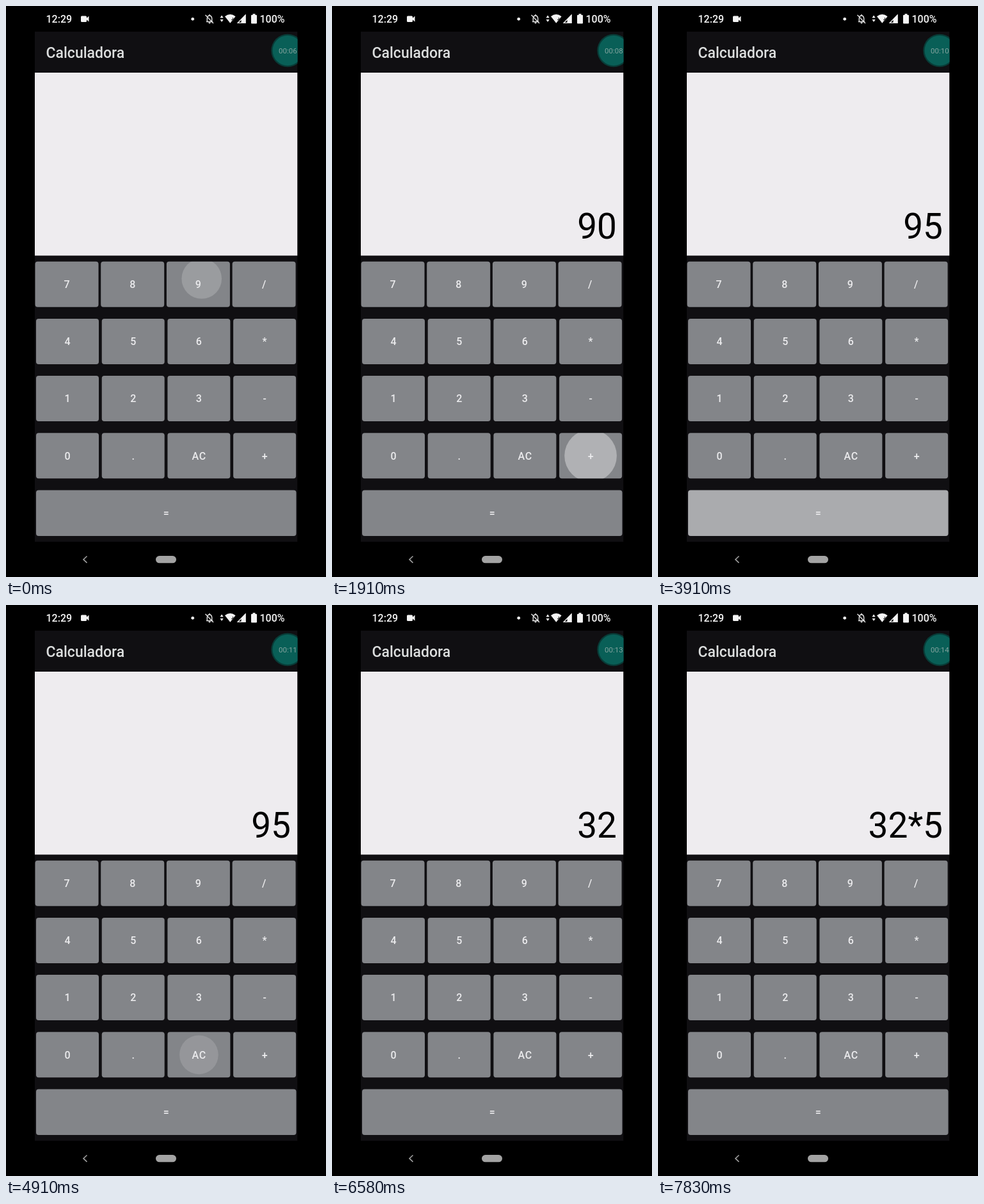
Animation of 500x891 px, one loop 8000 ms. Source, as an HTML page:

```html
<!DOCTYPE html>
<html lang="es">
<head>
<meta charset="utf-8">
<title>Calculadora</title>
<style>
  html, body { margin: 0; width: 100%; height: 100%; overflow: hidden; background: #000; }
  svg { display: block; width: 100%; height: 100%; }
  text { font-family: Roboto, sans-serif; }
  .medium { font-weight: 500; }
  .key { font-size: 16px; letter-spacing: .8px; fill: #ebebed; text-anchor: middle; }
</style>
</head>
<body>
<svg viewBox="0 0 500 891">
  <defs>
    <clipPath id="screen"><rect x="45" y="40" width="410.5" height="796"/></clipPath>
  </defs>
  <rect width="500" height="891"/>

  <!-- status bar -->
  <g fill="#f4f4f4">
    <text class="medium" x="62.5" y="26" font-size="16">12:29</text>
    <path d="M118.500 15.500h6q1.500 0 1.500 1.500v1.800l3.500-3v8.800l-3.500-3v1.900q0 1.500-1.500 1.500h-6q-1.500 0-1.500-1.500v-6.500q0-1.500 1.500-1.500z"/>
    <circle cx="291.700" cy="20.300" r="2.400"/>
    <path d="M313 24.500h10M314.300 24v-5q.4-3.600 3.700-4.300 3.300.7 3.700 4.300v5M318 14.500v-1.500M311.500 14l12.500 13" fill="none" stroke="#e4e4e4" stroke-width="1.400"/>
    <path d="M316.200 25.500h3.600q-.3 2-1.800 2t-1.800-2z"/>
    <path d="M334.500 18.500l2.600-4 2.600 4zM334.500 21l2.600 4 2.600-4z"/>
    <path d="M342 16.200q8.300-6.400 16.600 0l-8.300 10.600z"/>
    <path d="M354.500 18v6M352 21.500h5" stroke="#222" stroke-width="1" fill="none"/>
    <path d="M362.300 26.300L374 14.200v12.100z" fill="none" stroke="#f4f4f4" stroke-width="1.300"/>
    <path d="M367.500 20.800L374.500 13.500v13.300h-7z"/>
    <path d="M385.500 14v-1.800h4V14h1.500q1 0 1 1v11.500q0 1-1 1h-7q-1 0-1-1V15q0-1 1-1z"/>
    <text class="medium" x="396.5" y="26" font-size="16">100%</text>
  </g>

  <!-- app -->
  <g clip-path="url(#screen)">
    <rect x="44.500" y="40" width="411" height="796" fill="#100f12"/>
    <text class="medium" x="62.500" y="81" font-size="23" fill="#dcdede">Calculadora</text>
    <circle cx="440" cy="69.500" r="25.700" fill="#083b37"/>
    <circle cx="440" cy="69.500" r="23.500" fill="#095f57"/>
    <text id="timer" x="426" y="73.700" font-size="11.500" fill="#84a49f"></text>
    <rect x="44.500" y="104" width="411" height="285.500" fill="#eeecef"/>
    <text id="display" x="445" y="363" font-size="55" text-anchor="end"></text>
    <g id="keys"></g>
  </g>

  <!-- navigation bar -->
  <path d="M126.500 858.500l-5.500 5.200 5.500 5.200" fill="none" stroke="#a0a0a0" stroke-width="1.600"/>
  <rect x="234" y="858" width="32" height="11.300" rx="5.600" fill="#a3a3a3"/>
</svg>

<script>
const LOOP = 8000, GROW = 300, FADE = 190, RIPPLE_ALPHA = 0.36;
const $ = id => document.getElementById(id);
const clamp = v => Math.max(0, Math.min(1, v));
const smooth = p => p * p * (3 - 2 * p);
const mix = (a, b, p) => a + (b - a) * p;

function add(parent, tag, attrs, text = '') {
  const el = document.createElementNS('http://www.w3.org/2000/svg', tag);
  for (const name in attrs) el.setAttribute(name, attrs[name]);
  el.textContent = text;
  return parent.appendChild(el);
}

const keys = {};
function addKey(label, x, y, w, h) {
  const id = 'clip' + Object.keys(keys).length;
  const box = { x, y, width: w, height: h, rx: 4 };
  const cx = x + w / 2, cy = y + h / 2;
  add(add($('keys'), 'clipPath', { id }), 'rect', box);
  add($('keys'), 'rect', { ...box, fill: '#838589' });
  const ripple = add($('keys'), 'circle', { fill: '#fff', opacity: 0, 'clip-path': `url(#${id})` });
  add($('keys'), 'text', { class: 'key medium', x: cx + .4, y: cy + 5.7 }, label);
  keys[label] = { cx, cy, ripple, start: Math.max(w, h) * .3, end: Math.hypot(w, h) / 2 + 1 };
}

const rows = [['7', '8', '9', '/'], ['4', '5', '6', '*'], ['1', '2', '3', '-'], ['0', '.', 'AC', '+']];
rows.forEach((row, r) => row.forEach((label, c) => {
  const top = r === 0;
  addKey(label, (top ? 45.5 : 47) + c * 102.7, top ? 398.7 : 398.7 + r * 89.2, top ? 99 : 98, 71);
}));
addKey('=', 47, 755.5, 406.5, 71.5);

// down: touch, shown: display update, up: start of the fade
const presses = [
  { key: '9', down: -40, shown: 150, up: 270, value: '9', touch: [306, 425] },
  { key: '0', down: 710, shown: 900, up: 960, value: '90', touch: [101, 714] },
  { key: '+', down: 1790, shown: 2070, up: 2130, value: '90+' },
  { key: '5', down: 2655, shown: 2900, up: 2960, value: '90+5', touch: [198, 534] },
  { key: '=', down: 3630, shown: 3890, up: 3885, value: '95' },
  { key: 'AC', down: 4880, shown: 5070, up: 5130, value: '' },
  { key: '3', down: 5230, shown: 5470, up: 5640, value: '3' },
  { key: '2', down: 5720, shown: 5980, up: 6130, value: '32' },
  { key: '*', down: 6880, shown: 7070, up: 7140, value: '32*' },
  { key: '5', down: 7380, shown: 7570, up: 7635, value: '32*5' }
];

function drawRipple({ key, down, up, touch }, t) {
  const k = keys[key], p = smooth(clamp((t - down) / GROW));
  const [x, y] = touch || [k.cx, k.cy];
  const alpha = RIPPLE_ALPHA * clamp((t - down) / 80) * (1 - clamp((t - up) / FADE));
  k.ripple.setAttribute('cx', mix(x, k.cx, p));
  k.ripple.setAttribute('cy', mix(y, k.cy, p));
  k.ripple.setAttribute('r', mix(k.start, k.end, p));
  k.ripple.setAttribute('opacity', alpha);
}

function draw(now) {
  const t = now % LOOP;
  let value = '';
  for (const k of Object.values(keys)) k.ripple.setAttribute('opacity', 0);
  for (const press of presses) {
    if (t >= press.shown) value = press.value;
    if (t >= press.down && t < press.up + FADE) drawRipple(press, t);
  }
  $('display').textContent = value;
  const seconds = 6 + Math.floor((t + 510) / 1000);
  $('timer').textContent = '00:' + String(seconds).padStart(2, '0');
}

const begin = performance.now();
function tick() {
  draw(performance.now() - begin);
  requestAnimationFrame(tick);
}
tick();
</script>
</body>
</html>
```
